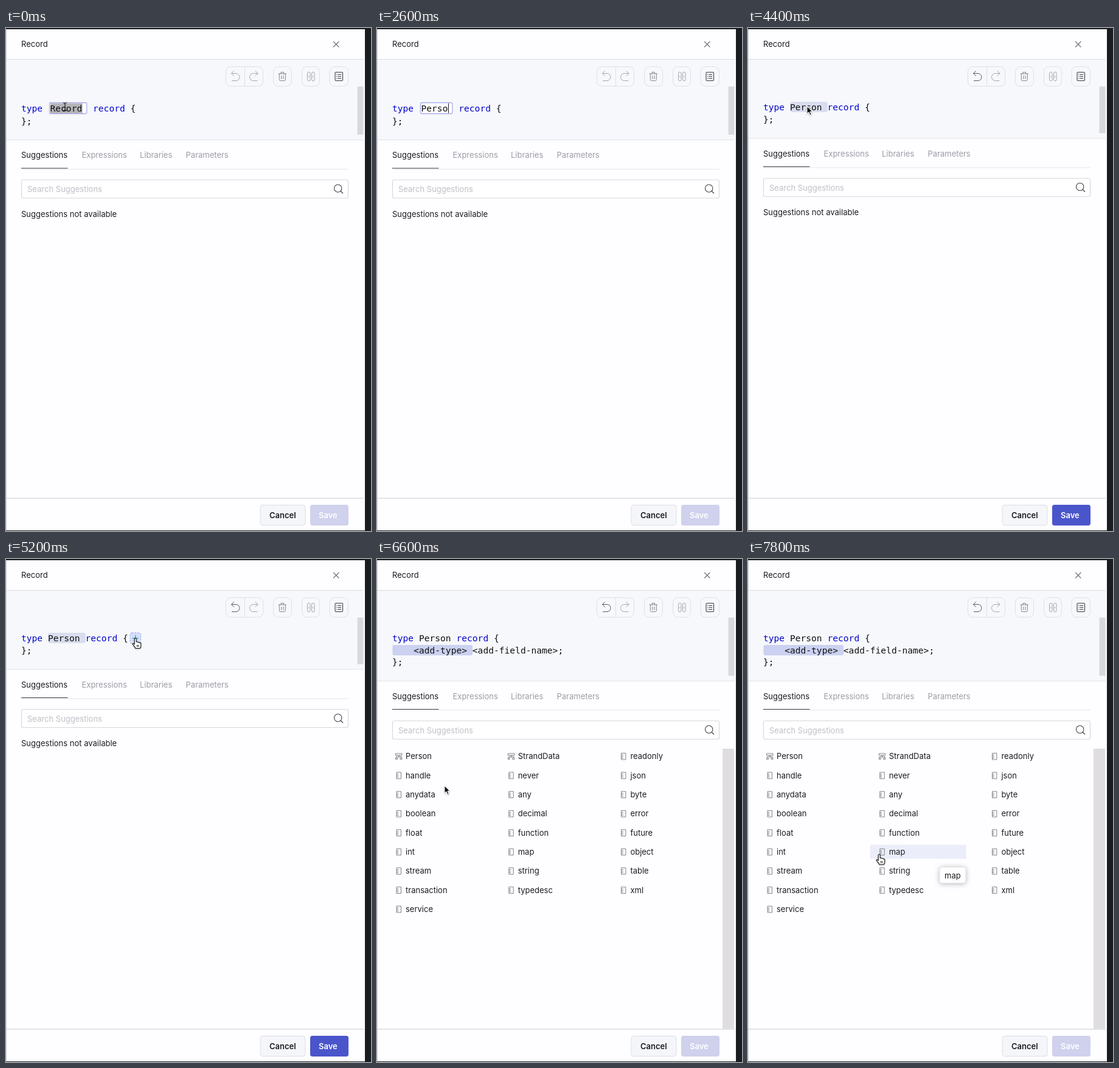
Animation, 600 px wide and 825 px high, one loop 8000 ms. Source, as an HTML page:

```html
<!DOCTYPE html>
<html lang="en">
<head>
<meta charset="utf-8">
<title>Record editor</title>
<style>
  html, body { margin: 0; height: 100%; overflow: hidden; background: #1a1d1f; }
  svg { display: block; width: 600px; height: 825px; }
  text { font: 13px Inter, sans-serif; fill: #1c1c21; white-space: pre; }
  .code { font: 14.6px "DejaVu Sans Mono", monospace; fill: #111; }
  .key { fill: #0505cc; }
  .bold { font-weight: 600; }
  .light { fill: #fff; }
  .muted { fill: #9c9ca6; }
  .hint { fill: #c0c0c7; }
  .icon { fill: none; stroke-linecap: round; stroke-linejoin: round; }
  .frame { fill: none; stroke: #dce0ea; }
  .pointer { stroke-width: 1.1; stroke-linejoin: round; filter: drop-shadow(0 1px 1px #0004); }
  .tip { stroke: #e3e3e8; filter: drop-shadow(0 1px 4px #0004); }
</style>
</head>
<body>
<svg viewBox="0 0 600 825"><g id="fixed"></g><g id="live"></g></svg>
<script>
const LOOP = 8000, COMMIT = 3420, CLICK = 5240;
const CHAR = 8.79, LEFT = 25, ROW = 31.35;
const KEYS = [1000, 1400, 1800, 2200, 2600, 3000];
const TYPES = `Person StrandData readonly handle never json anydata any byte boolean decimal error
  float function future int map object stream string table transaction typedesc xml service`.split(/\s+/);
// Pointer stops: time, x, y
const PATH = [
  [4400, 97, 128], [4800, 213, 130], [5800, 213, 130], [6400, 185, 300], [6600, 111, 371.5],
  [6800, 111, 371.5], [7100, 122, 448], [7300, 155, 480], [7500, 216, 484.5], [8000, 216, 484.5]
];

const escape = s => s.replace(/&/g, '&amp;').replace(/</g, '&lt;');
const text = (x, y, s, cls = '') => `<text x="${x}" y="${y}" class="${cls}">${escape(s)}</text>`;
const code = (x, y, s, key) => text(x, y, s, key ? 'code key' : 'code');
const rect = (x, y, w, h, fill, r = 0, more = '') =>
  `<rect x="${x}" y="${y}" width="${w}" height="${h}" rx="${r}" fill="${fill}" ${more}/>`;
const icon = (d, color = '#a3a6af', width = 1) =>
  `<path class="icon" stroke="${color}" stroke-width="${width}" d="${d}"/>`;
const frame = (x, w) => `<rect class="frame" x="${x}" y="63.5" width="${w}" height="32" rx="8"/>`;
const ease = v => { v = Math.min(1, Math.max(0, v)); return v * v * (3 - 2 * v); };

function fixedParts() {
  return rect(0, 2, 590, 822, '#fefdff')
    + rect(0, 2, 1, 822, '#d2d5dc')
    + text(25, 31, 'Record')
    + icon('M538.5 22.5l8.5 8.5m0-8.5l-8.5 8.5', '#74747c', 1.3)
    + rect(1, 770.5, 587, 1.5, '#d9dbe1')
    + rect(418, 782.5, 74, 33, '#f5f6fa', 4, 'stroke="#dcdfe8"')
    + text(433, 804, 'Cancel', 'bold')
    + rect(500, 782, 63, 34, '#cfd1ed', 4);
}

function toolbar(canUndo) {
  return frame(361.5, 61) + frame(439.5, 30) + frame(486.5, 29) + frame(532, 30.5)
    + icon('M392.5 64v31', '#dce0ea')
    + icon('M374.5 70.5l-4 4 4 4M370.5 74.5h7.5a6 6 0 0 1 0 12h-6.5', canUndo ? '#5a5a63' : '#a3a6af')
    + icon('M410 70.5l4 4-4 4M414 74.5h-7.5a6 6 0 0 0 0 12h6.5')
    + icon('M448 75h12.5M452 75v-2.5h4.5v2.5M449.3 75v9.5q0 2 2 2h6q2 0 2-2V75M452.7 78.5v5m3.2-5v5', '#85858e')
    + icon('M495.5 74.5a2.2 2.2 0 0 1 4.6 0v10a2.2 2.2 0 0 1-4.6 0zM502.5 74.5a2.2 2.2 0 0 1 4.6 0v10a2.2 2.2 0 0 1-4.6 0zM497.8 79v1.5m7-1.5v1.5')
    + icon('M542.5 72.5h9.5q1.5 0 1.5 1.5v11q0 1.5-1.5 1.5h-9.5q-1.5 0-1.5-1.5V74q0-1.5 1.5-1.5zM543.5 76.5h.2m2 0h5M543.5 79.5h.2m2 0h5M543.5 82.5h.2m2 0h5', '#3f3f47', 1.1);
}

function nameField(t) {
  const count = KEYS.filter(k => k <= t).length;
  const name = count ? 'Person'.slice(0, count) : 'Record';
  const width = name.length * CHAR, after = 90.3 + width;
  return code(LEFT, 136.5, 'type', true)
    + rect(71.5, 122.5, width + 8.5, 18, '#fff', 2, 'stroke="#a9acf0" stroke-width="1.3"')
    + (count ? rect(73 + width, 123.5, 1, 16, '#111') : rect(73, 123.5, width, 16.5, '#b4b4b8'))
    + code(72.5, 136.5, name)
    + code(after, 136.5, 'record', true) + code(after + 7 * CHAR, 136.5, '{')
    + code(LEFT, 157.5, '};');
}

function statement(t) {
  const adding = t >= CLICK;
  let out = adding
    ? rect(25.5, 141, 131.5, 17, '#cbd1f0', 3) + code(LEFT + 4 * CHAR, 154.5, '<add-type> <add-field-name>;')
    : rect(69, 121, 62, 17, '#d9ddef', 4);
  out += code(LEFT, 135, 'type', true) + code(LEFT + 5 * CHAR, 135, 'Person')
    + code(LEFT + 12 * CHAR, 135, 'record', true) + code(LEFT + 19 * CHAR, 135, '{')
    + code(LEFT, adding ? 174 : 154.5, '};');
  if (!adding && t >= 4800) {
    out += rect(204, 121, 17.5, 18, '#d5e0fb', 3, 'stroke="#9d9de8" stroke-dasharray="2.5 2"')
      + icon('M208.5 130h8.5m-4.2-4.2v8.5', '#36a3ad', 1.5);
  }
  return out;
}

function tabs(top) {
  return ['Suggestions', 'Expressions', 'Libraries', 'Parameters']
    .map((s, i) => text([25, 124.5, 220, 295.5][i], top + 30, s, i ? 'muted' : '')).join('')
    + rect(25, top + 48, 538, 1, '#e5e5ea') + rect(25, top + 46.5, 76.5, 1, '#3b3b43')
    + rect(25.5, top + 66, 537, 30, '#fff', 3, 'stroke="#d8d8de" stroke-width="1.2"')
    + text(35, top + 86, 'Search Suggestions', 'hint')
    + icon(`M539.5 ${top + 80}a6.2 6.2 0 1 1 12.4 0a6.2 6.2 0 1 1-12.4 0m10.7 4.5l3.5 3.5`, '#3f3f47', 1.1);
}

const cell = i => ({ x: 16 + 184.7 * (i % 3), y: 323.5 + ROW * Math.floor(i / 3) });

function typeIcon(x, y, isRecord) {
  const shape = isRecord
    ? 'm-1-4.5h10v3h-10zm5 3v4m-4 0v-2h8v2m-9 0h2.5v2.5h-2.5zm7.5 0h2.5v2.5h-2.5z'
    : 'm.5-5h7v10.5h-7zm0 3h2.5m-2.5 2.5h2.5m-2.5 2.5h2.5';
  return icon(`M${x} ${y}${shape}`, '#74747c', .9);
}

function typeList(hovered, t) {
  let out = rect(568, 311, 19, 459.5, '#dfdde0');
  TYPES.forEach((name, i) => {
    const { x, y } = cell(i);
    if (i === hovered) out += rect(x, y - 11.5, 158, 23, '#ebeefa');
    out += typeIcon(x + 16, y, i < 2) + text(x + 31, y + 4.7, name);
  });
  if (TYPES[hovered] === 'map' && t > 7650) {
    out += rect(315, 505.5, 43, 26, '#fff', 4, 'class="tip"') + text(323, 523.5, 'map');
  }
  return out;
}

function pointerAt(t) {
  if (t < KEYS[0]) return { x: 97, y: 129, kind: 'beam' };
  if (t < PATH[0][0]) return null;
  const i = PATH.findIndex(p => p[0] > t);
  const [t0, x0, y0] = PATH[i - 1], [t1, x1, y1] = PATH[i];
  const k = ease((t - t0) / (t1 - t0));
  return { x: x0 + (x1 - x0) * k, y: y0 + (y1 - y0) * k, kind: t >= 4750 && t < CLICK ? 'hand' : 'arrow' };
}

const POINTERS = {
  beam: ['M-3-6.5q3 0 3 2q0-2 3-2M0-4.5v9M-3 6.5q3 0 3-2q0 2 3 2M-1.5 1h3', 'none', '#222'],
  arrow: ['M0 0v12.8l3-2.7 2.2 5 2.2-1-2.2-4.8h4z', '#0a0a0a', '#fff'],
  hand: ['M-1.8 10V1.5q0-1.5 1.5-1.5t1.5 1.5V6q2-.8 2.8.7 1.8-.7 2.6.7 2.2-.3 2.2 2v3q0 2-1.5 4.1H-.2q-.6-2.3-2.6-4L-5 9.2q.8-1.8 3.2.8zM2.6 11v3m2.2-3v3', '#fff', '#111']
};

function pointer({ x, y, kind }) {
  const [d, fill, stroke] = POINTERS[kind];
  return `<path class="pointer" transform="translate(${x} ${y})" d="${d}" fill="${fill}" stroke="${stroke}"/>`;
}

function scene(t) {
  const committed = t >= COMMIT, listing = t >= CLICK;
  const top = listing ? 199.5 : committed ? 180.5 : 183;
  const p = pointerAt(t);
  const hovered = listing ? TYPES.findIndex((_, i) => {
    const { x, y } = cell(i);
    return p.x >= x && p.x <= x + 158 && Math.abs(p.y - y) < 11.5;
  }) : -1;
  if (hovered >= 0) p.kind = 'hand';
  const enabled = ease((t - COMMIT) / 250) - ease((t - CLICK) / 250);
  return rect(1, 51, 587, top - 51, '#f6f8fb')
    + rect(1, 51, 587, 1, '#d9dce2') + rect(1, top, 587, 1, '#dfe2e8')
    + rect(577.5, 96, 10, top - 104, '#d9d9dc')
    + toolbar(committed)
    + (committed ? statement(t) : nameField(t))
    + tabs(top)
    + (listing ? typeList(hovered, t) : text(25, top + 126.5, 'Suggestions not available'))
    + rect(500, 782, 63, 34, '#4b55cb', 4, `opacity="${enabled}"`)
    + text(514, 804, 'Save', 'bold light')
    + (p ? pointer(p) : '');
}

const live = document.getElementById('live');
document.getElementById('fixed').innerHTML = fixedParts();
function draw() {
  live.innerHTML = scene(performance.now() % LOOP);
  requestAnimationFrame(draw);
}
draw();
</script>
</body>
</html>
```
